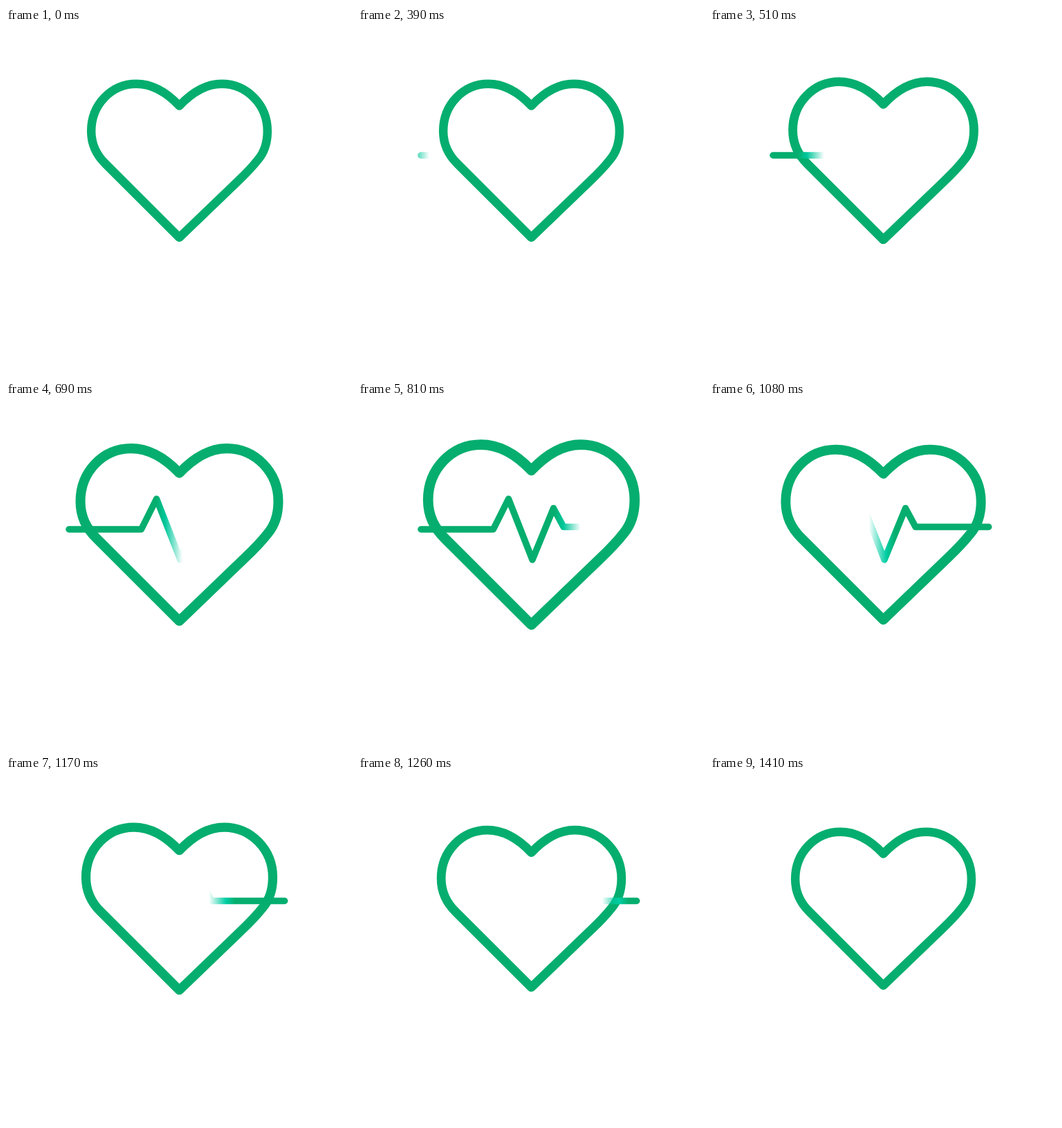
Recreate the animation shown at these times as an HTML page. Size 500x500 px, loop 1800 ms.

```html
<!DOCTYPE html>
<html lang="en">
<head>
<meta charset="utf-8">
<title>Heartbeat</title>
<style>
  html, body { margin: 0; width: 100%; height: 100%; overflow: hidden; background: #fff; }
  svg { display: block; width: 100vw; height: 100vh; }
  path { fill: none; stroke-linecap: round; stroke-linejoin: round; }
</style>
</head>
<body>
<svg viewBox="0 0 500 500">
  <defs>
    <linearGradient id="sweep" gradientUnits="userSpaceOnUse" y1="0" y2="0">
      <stop stop-color="#00cda3" stop-opacity="0"/>
      <stop stop-color="#00cda3"/>
      <stop stop-color="#05ae6e"/>
      <stop stop-color="#05ae6e"/>
      <stop stop-color="#00c79b"/>
      <stop stop-color="#00c79b" stop-opacity="0"/>
    </linearGradient>
  </defs>
  <path id="heart" stroke="#05ae6e" stroke-width="12.5"
    d="M250.5 302.8 L144 196.5 C130 183 123.2 167 123.2 149 C123.2 111 152 80.8 188.5 80.8
       C212 80.8 233 94 250.5 112.5 C268 94 289 80.8 311.5 80.8 C348 80.8 377.8 111 377.8 149
       C377.8 165 373 180 364 190.5 C355 202 345 212 334.5 222 Z"/>
  <path id="pulse" stroke="url(#sweep)" stroke-width="9.5"
    d="M91 184 H195.5 L217.5 140 L252 228 L282.5 153.5 L297 180.5 H402.7"/>
</svg>
<script>
  const LOOP = 1800, STEP = 30;
  const START = 390, PEAK = 870, END = 1410;
  const GROWTH = 0.18, FADE = 25, TINT = 38;
  const heart = document.getElementById('heart');
  const pulse = document.getElementById('pulse');
  const sweep = document.getElementById('sweep');
  const stops = sweep.querySelectorAll('stop');

  // [time, x] of the leading and trailing ends of the pulse
  const head = [[390, 103], [510, 165], [690, 255], [960, 405], [1050, 460]];
  const tail = [[690, -60], [840, 50], [960, 145], [1170, 293], [1410, 452]];

  const clamp = v => Math.min(1, Math.max(0, v));

  function track(keys, t) {
    let x = keys[0][1];
    for (let i = 1; i < keys.length; i++) {
      const [t0, x0] = keys[i - 1], [t1, x1] = keys[i];
      if (t >= t0) x = x0 + (x1 - x0) * clamp((t - t0) / (t1 - t0));
    }
    return x;
  }

  // cubic-bezier(a, 0, b, 1), solved by bisection
  function ease(p, a, b) {
    let lo = 0, hi = 1;
    for (let i = 0; i < 24; i++) {
      const s = (lo + hi) / 2, r = 1 - s;
      if (3 * r * r * s * a + 3 * r * s * s * b + s * s * s < p) lo = s;
      else hi = s;
    }
    return lo * lo * (3 - 2 * lo);
  }

  function beat(t) {
    if (t <= START || t >= END) return 0;
    return t < PEAK
      ? ease((t - START) / (PEAK - START), 1 / 3, 2 / 3)
      : 1 - ease((t - PEAK) / (END - PEAK), 0.33, 0.54);
  }

  function draw(t) {
    const scale = 1 + GROWTH * beat(t);
    heart.setAttribute('transform',
      `translate(250.5 192) scale(${scale}) translate(-250.5 -192)`);

    pulse.style.display = t >= START && t < END ? '' : 'none';
    const l = track(tail, t), r = track(head, t), w = r - l;
    sweep.setAttribute('x1', l);
    sweep.setAttribute('x2', r);
    [0, FADE, TINT, w - TINT, w - FADE, w].forEach((d, i) =>
      stops[i].setAttribute('offset', clamp(d / w)));
  }

  const origin = performance.now();
  function tick() {
    const t = (performance.now() - origin) % LOOP;
    draw(Math.floor(t / STEP) * STEP);
    requestAnimationFrame(tick);
  }
  tick();
</script>
</body>
</html>
```
